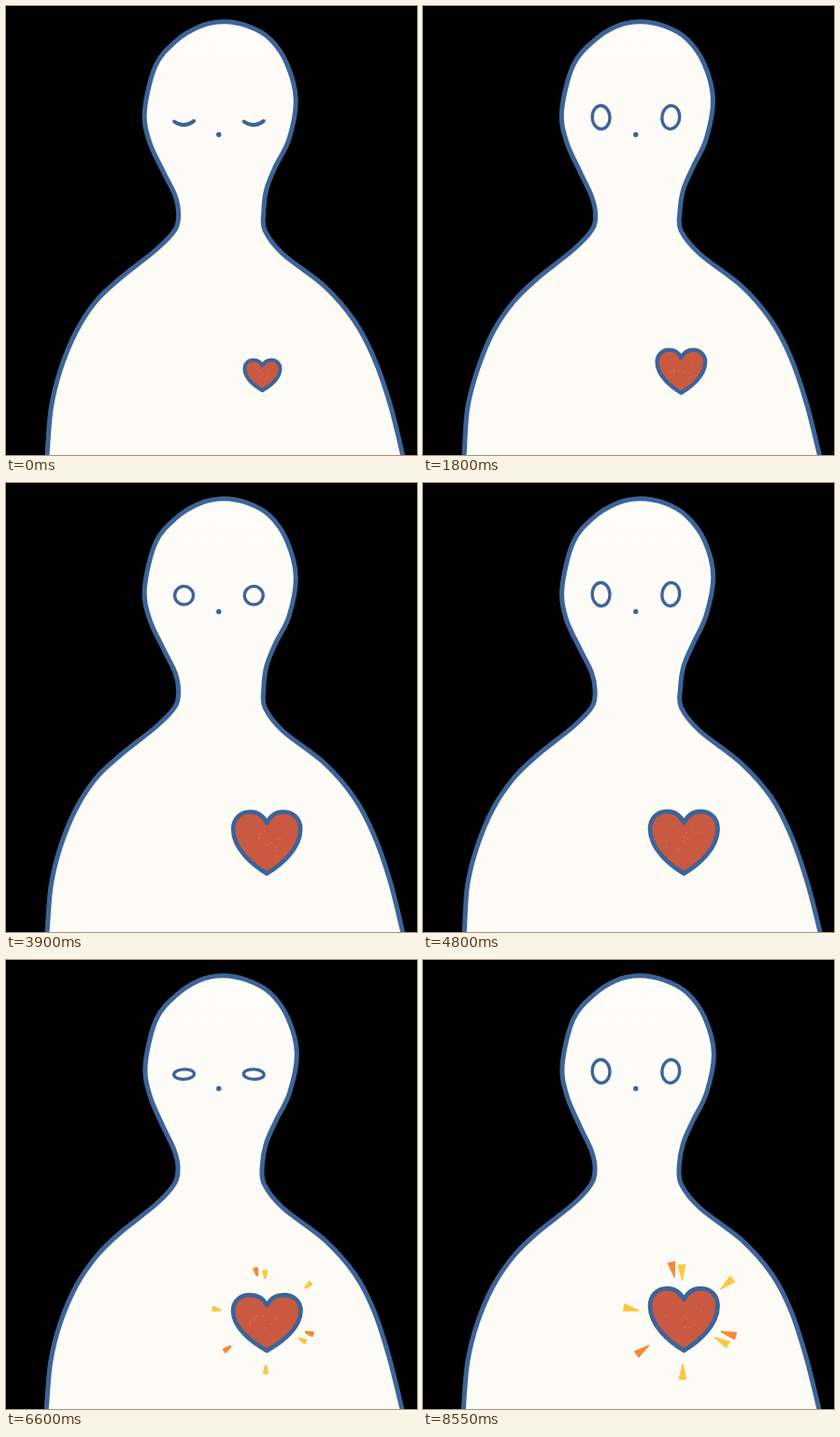
An HTML page with a canvas that plays this animation: 440x480 px, repeating every 8.7 s.

```html
<!DOCTYPE html>
<html lang="en">
<head>
<meta charset="utf-8">
<title>Growing heart</title>
<style>
html, body { margin: 0; width: 100%; height: 100%; overflow: hidden; background: #000; }
canvas { display: block; }
</style>
</head>
<body>
<canvas id="stage" width="440" height="480"></canvas>
<script>
const ctx = document.getElementById('stage').getContext('2d');
const STEP = 150, STEPS = 58, DRAWINGS = 13, BLINK = 19;
const BLUE = '#3d6498', RED = '#c95a41', ORANGE = '#f6893a', YELLOW = '#f9c843';

// Key points of the figure, from bottom left over the crown to bottom right
const outline = [
  [43.5, 480], [48, 430], [59, 388], [76, 348], [97, 316], [121, 292], [161, 260],
  [180, 239], [184, 222], [181, 203], [169, 178], [154, 145], [149, 112],
  [160, 64], [181, 38], [206, 22], [232, 16.8], [259, 21.5], [283, 35], [302, 62],
  [311, 100], [303, 142], [288, 172], [278, 196], [275, 220], [277, 240],
  [297, 265], [342, 300], [373, 336], [393, 375], [410, 425], [424, 480]
];

// angle in degrees, distance from the heart, colour
const rays = [
  [-102, 55, ORANGE], [-92, 51, YELLOW], [-40, 60, YELLOW], [-168, 57, YELLOW],
  [144, 54, ORANGE], [91, 55, YELLOW], [17, 50, ORANGE], [29, 46, YELLOW]
];

const clamp = v => Math.max(0, Math.min(1, v));
const mix = (a, b, t) => a + (b - a) * t;
const smooth = v => { const t = clamp(v); return t * t * (3 - 2 * t); };
const rand = n => { const v = Math.sin(n * 127.1) * 43758.5453; return v - Math.floor(v); };

const skin = ctx.createLinearGradient(0, 0, 0, 480);
skin.addColorStop(0, '#fdfcf9');
skin.addColorStop(1, '#fdfbf5');

function dot(x, y, r) {
  ctx.beginPath();
  ctx.arc(x, y, r, 0, Math.PI * 2);
  ctx.fill();
}

// Smooth curve through all points
function spline(p) {
  ctx.beginPath();
  ctx.moveTo(...p[0]);
  for (let i = 0; i < p.length - 1; i++) {
    const a = p[i - 1] || p[i], b = p[i], c = p[i + 1], d = p[i + 2] || c;
    ctx.bezierCurveTo(b[0] + (c[0] - a[0]) / 6, b[1] + (c[1] - a[1]) / 6,
      c[0] - (d[0] - b[0]) / 6, c[1] - (d[1] - b[1]) / 6, c[0], c[1]);
  }
}

// Each drawing of the body wavers a little, as if traced by hand
function drawBody(step) {
  const seed = step % DRAWINGS + 1;
  const points = outline.map(([x, y], i) => [
    x + 0.8 * Math.sin(i * 0.8 + rand(seed) * 6.3) + 0.8 * (rand(seed * 50 + i) - 0.5), y
  ]);
  spline([[42, 495], ...points, [428, 495]]);
  ctx.fillStyle = skin;
  ctx.fill();
  ctx.strokeStyle = BLUE;
  ctx.lineWidth = 5;
  ctx.stroke();
}

// 0 is closed, 1 is wide open
function eyeOpenness(step) {
  const phase = step < 46 ? step % BLINK : BLINK / 2;
  return Math.min(smooth((phase - 4.2) / 4), smooth((BLINK + 0.2 - phase) / 4));
}

function drawEye(x, open, tilt) {
  const y = 124.5 - 5.5 * open;
  ctx.beginPath();
  if (open) {
    ctx.ellipse(x, y, 12 - 2.6 * open, 12.5 * open, tilt, 0, Math.PI * 2);
  } else {
    ctx.moveTo(x - 10.5, y - 1);
    ctx.quadraticCurveTo(x - 1, y + 6.5, x + 10.5, y - 1.5);
  }
  ctx.lineWidth = open ? 3.3 : 4;
  ctx.stroke();
}

function drawFace(step) {
  const open = eyeOpenness(step);
  ctx.strokeStyle = ctx.fillStyle = BLUE;
  drawEye(190.6, open, -0.05);
  drawEye(265.3, open, 0.1 * open);
  dot(227.8, 137.5, 2.7);
}

function drawHeart(step) {
  const grown = smooth(step / 28);
  const beat = Math.sin(Math.PI * clamp((step - 40) / 8));
  const cx = mix(274.5, 279.3, grown), w = mix(38, 72.5, grown);
  const h = mix(32.5, 66.5, grown) - 7 * beat;
  const top = mix(411, 417.6, grown) - h;
  const curve = (...c) => ctx.bezierCurveTo(
    ...c.map((v, i) => i % 2 ? top + v * h : cx + v * w));
  ctx.beginPath();
  ctx.moveTo(cx, top + 0.18 * h);
  curve(-0.05, 0.07, -0.14, 0, -0.25, 0);
  curve(-0.4, 0, -0.5, 0.12, -0.5, 0.28);
  curve(-0.5, 0.6, -0.21, 0.86, 0, 1);
  curve(0.21, 0.86, 0.5, 0.6, 0.5, 0.28);
  curve(0.5, 0.12, 0.4, 0, 0.25, 0);
  curve(0.14, 0, 0.05, 0.07, 0, 0.18);
  ctx.closePath();
  ctx.fillStyle = RED;
  ctx.fill();
  ctx.strokeStyle = BLUE;
  ctx.lineWidth = mix(4, 4.7, grown);
  ctx.stroke();

  // crayon specks
  ctx.fillStyle = 'rgba(240, 165, 130, 0.55)';
  for (let i = 0; i < w / 6; i++) {
    const n = step * 31 + i * 2 + 1;
    dot(cx + (rand(n) - 0.5) * w * 0.55, top + (0.28 + rand(n + 1) * 0.35) * h, 0.6);
  }
}

function drawRays(step) {
  const grow = clamp((step - 42) / 4.5);
  if (!grow) return;
  const half = 8 * grow, wide = 3.6 * grow;
  ctx.lineWidth = mix(4, 1.4, grow);
  for (const [angle, far, color] of rays) {
    ctx.save();
    ctx.translate(279, 385);
    ctx.rotate(angle * Math.PI / 180);
    ctx.translate(far - 4 * (1 - grow), 0);
    ctx.beginPath();
    ctx.moveTo(-half, 0);
    ctx.lineTo(half, wide);
    ctx.lineTo(half, -wide);
    ctx.closePath();
    ctx.fillStyle = ctx.strokeStyle = color;
    ctx.fill();
    ctx.stroke();
    ctx.restore();
  }
}

function draw(step) {
  ctx.fillStyle = '#000';
  ctx.fillRect(0, 0, 440, 480);
  ctx.lineCap = ctx.lineJoin = 'round';
  drawBody(step);
  drawFace(step);
  drawRays(step);
  drawHeart(step);
}

const start = performance.now();
function tick() {
  const elapsed = Math.max(0, performance.now() - start);
  draw(Math.floor(elapsed / STEP) % STEPS);
  requestAnimationFrame(tick);
}
tick();
</script>
</body>
</html>
```
